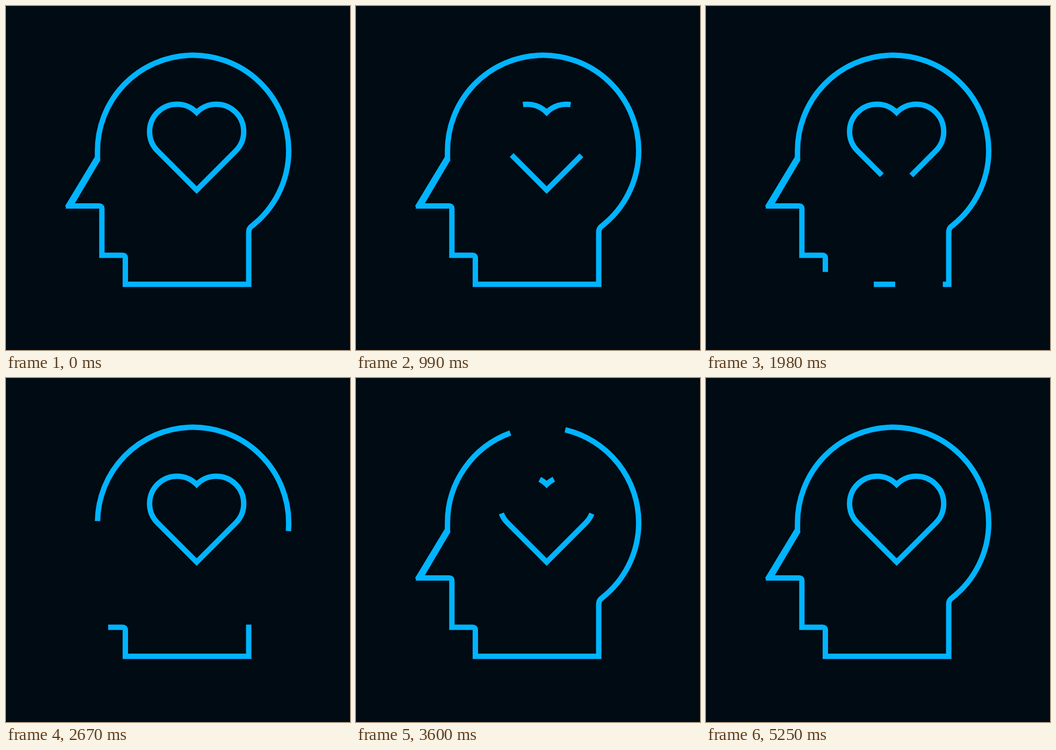
Recreate the animation shown at these times as an HTML page with a canvas. Size 640x640 px, loop 5400 ms.

```html
<!DOCTYPE html>
<html lang="en">
<head>
<meta charset="utf-8">
<title>Head and heart</title>
<style>
  html, body { margin: 0; width: 100%; height: 100%; overflow: hidden; background: #000b14; }
  canvas { display: block; width: 640px; height: 640px; }
</style>
</head>
<body>
<canvas id="stage" width="640" height="640"></canvas>
<script>
const ctx = document.getElementById('stage').getContext('2d');
const LOOP = 5400, STEP = 30;
const BACK = '#000b14', LINE = '#00b4ff';
const clamp = (v, lo, hi) => Math.min(hi, Math.max(lo, v));

function shape(d) {
  const el = document.createElementNS('http://www.w3.org/2000/svg', 'path');
  el.setAttribute('d', d);
  return { path: new Path2D(d), len: el.getTotalLength() };
}

// Both head halves run from the middle of the neck to the top of the skull.
const face = shape('M333 517.7H222V468.7Q222 463.7 217 463.7H178.4V377Q178.4 372 173.4 372' +
  'H119.3L170.2 284.5V269.5A178 178 0 0 1 340 91.7');
const nape = shape('M333 517.7H451.6V421Q451.6 413.5 457 409.7' +
  'A178 178 0 0 0 526 269.5A178 178 0 0 0 340 91.7');
const nose = new Path2D('M165 281L176 286L128 367L113 377L110 372Z');

// The heart legs cross slightly at the tip so that their ends form a sharp corner.
const heart = shape('M358.24 345.94L281.6 269.3A51 51 0 0 1 354.7 198.1' +
  'A51 51 0 0 1 427.8 269.3L351.16 345.94');
const half = heart.len / 2;
const tip = { x: 354.7, y: 349.5 };

function strokeDash(path, dash, width = 10) {
  ctx.setLineDash(dash);
  ctx.lineWidth = width;
  ctx.stroke(path);
}

// Steady run along a heart side, slow at the tip.
function trace(ms) {
  const s = ms < 1478 ? 0.178 * ms : 263 + 0.03 * (ms - 1478);
  return clamp(s, 0, half);
}

function drawHeart(t) {
  const start = t < 2700 ? 26 : 2816;
  const lead = trace(t - start);
  const tail = trace(t - start - 692);
  if (lead <= tail) {
    strokeDash(heart.path, []);
    return;
  }
  const rest = half - lead, gap = lead - tail;
  const leg = rest >= 10 ? rest : 0;
  strokeDash(heart.path, [leg, gap + rest - leg, 2 * tail, gap + rest - leg, leg, 1000]);
  if (!leg && rest > 0) {
    const r = rest / Math.SQRT2;
    ctx.beginPath();
    ctx.moveTo(tip.x, tip.y);
    ctx.lineTo(tip.x - r, tip.y - r);
    ctx.lineTo(tip.x, tip.y - 2 * r);
    ctx.lineTo(tip.x + r, tip.y - r);
    ctx.fill();
  }
}

const ramp = (t, start, rate) => clamp((t - start) * rate, 0, 1) ** 2;

function headTail(t) {
  return t < 3420 ? ramp(t, 1645, 1 / 2002) : Math.min(1, 0.786 + (t - 3420) * 0.00078);
}

function headDash(side, lead, tail) {
  if (lead <= tail) return [];
  return [tail * side.len, (lead - tail) * side.len, side.len + 10, 1000];
}

function drawHead(t) {
  const tail = headTail(t);
  const faceDash = headDash(face, ramp(t, 1198, 0.000543), tail);
  strokeDash(face.path, faceDash);
  strokeDash(nape.path, headDash(nape, ramp(t, 1183, 0.0005), tail));
  // The nose bridge is a little heavier than the other lines.
  ctx.save();
  ctx.clip(nose);
  strokeDash(face.path, faceDash, 18);
  ctx.restore();
}

function frame(now) {
  const t = Math.floor((now % LOOP) / STEP) * STEP;
  ctx.fillStyle = BACK;
  ctx.fillRect(0, 0, 640, 640);
  ctx.fillStyle = ctx.strokeStyle = LINE;
  drawHead(t);
  drawHeart(t);
}

let origin = null;
function tick(now) {
  if (origin === null) origin = now;
  frame(Math.max(0, now - origin));
  requestAnimationFrame(tick);
}
frame(0);
requestAnimationFrame(tick);
</script>
</body>
</html>
```
